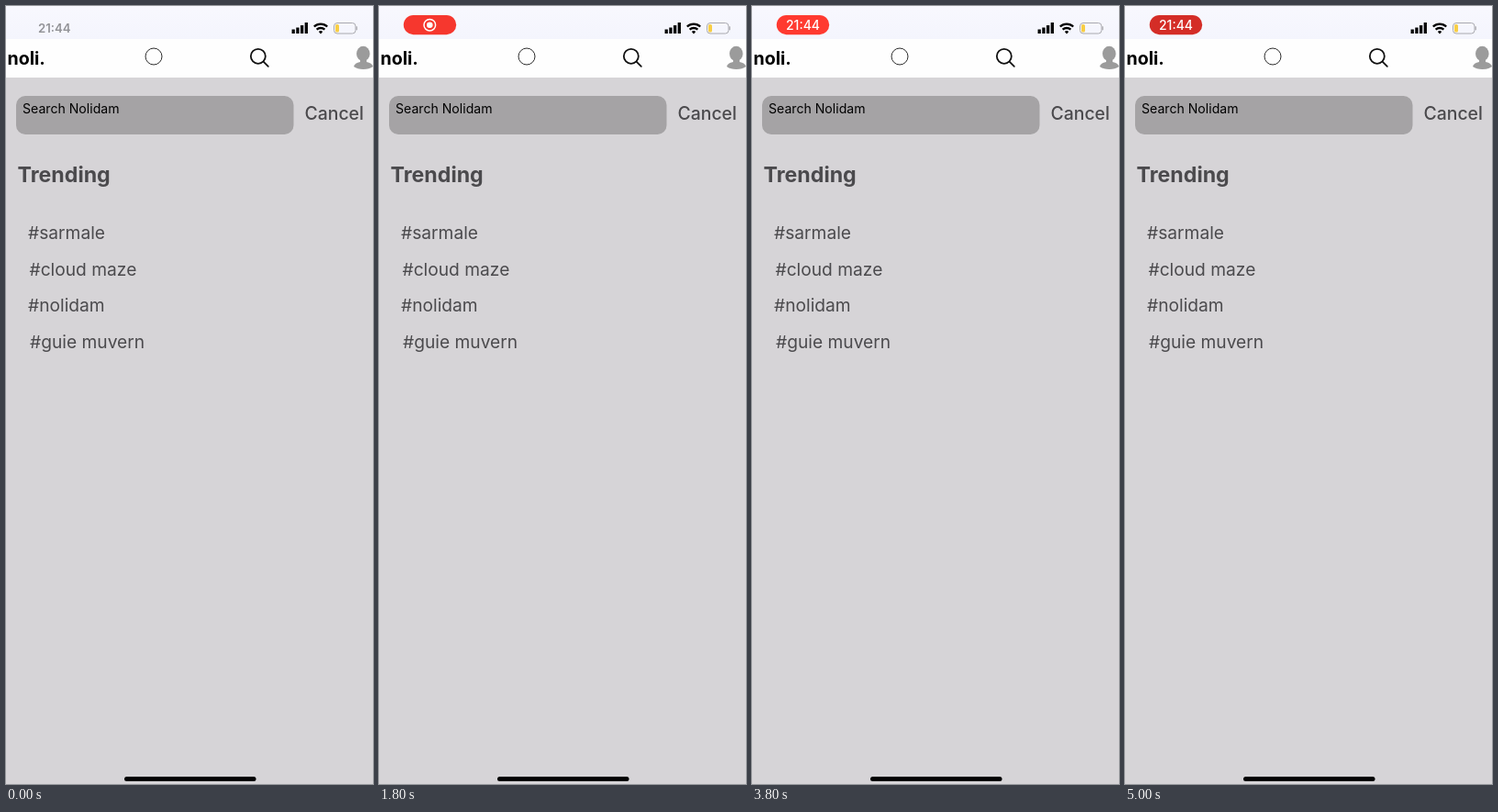
Write an HTML page that moves like this. It is 400 px wide and 848 px high and loops after 5040 ms.

```html
<!DOCTYPE html>
<html lang="ro">
<head>
<meta charset="utf-8">
<style>
  html, body { margin: 0; width: 100%; height: 100%; overflow: hidden; background: #d6d4d7; }
  svg { display: block; width: 400px; height: 848px; font-family: Inter, sans-serif; }
  #list, #trending, #cancel { fill: #4b4a4d; }
  #list { font-size: 19.2px; }
  #banner { filter: drop-shadow(0 0 1px rgba(0, 0, 0, .25)); }
</style>
</head>
<body>
<svg viewBox="0 0 400 848">
  <defs>
    <linearGradient id="glass" x1=".4" x2=".3" y2="1">
      <stop stop-color="#767577"/>
      <stop offset=".6" stop-color="#717072"/>
      <stop offset="1" stop-color="#676668"/>
    </linearGradient>
    <linearGradient id="sky" x2="0" y2="1">
      <stop stop-color="#f8f8fe"/>
      <stop offset="1" stop-color="#f4f5fd"/>
    </linearGradient>
  </defs>

  <rect width="400" height="848" fill="#d6d4d7"/>
  <rect width="400" height="36" fill="url(#sky)"/>
  <rect y="36" width="400" height="42" fill="#fefefe"/>

  <!-- navigation -->
  <text x="1.5" y="64" font-size="19.6" font-weight="700">noli.</text>
  <circle cx="161" cy="55" r="9" fill="none" stroke="#2b2b2b"/>
  <g fill="none" stroke="#111" stroke-width="1.8" stroke-linecap="round">
    <circle cx="274.800" cy="54.800" r="8"/>
    <path d="M280.800 60.800l5 5"/>
  </g>
  <g fill="#9b9b9b">
    <ellipse cx="389.300" cy="52" rx="7.300" ry="8.300"/>
    <path d="M386 57h7v4q6 1 7 5q-4 3-10.500 3t-10.500-3q1-4 7-5z"/>
  </g>

  <!-- search page -->
  <rect x="11" y="98" width="302.500" height="42" rx="10" fill="#a5a3a5"/>
  <text x="18" y="117" font-size="14.1">Search Nolidam</text>
  <text id="cancel" x="325.500" y="124" font-size="19.400" font-weight="500">Cancel</text>
  <text id="trending" x="12.500" y="192" font-size="23.200" font-weight="700">Trending</text>
  <g id="list">
    <text x="24" y="253.500">#sarmale</text>
    <text x="25.500" y="293.500">#cloud maze</text>
    <text x="24" y="333">#nolidam</text>
    <text id="pressed" x="26" y="373">#guie muvern</text>
  </g>
  <rect x="129" y="840" width="143.500" height="5" rx="2.500"/>

  <!-- status bar -->
  <path d="M313.200 30v-4.500M317.900 30v-6.500M322.600 30v-9M327.300 30v-12" stroke="#000" stroke-width="3.300"/>
  <g fill="none" stroke="#000" stroke-width="2.300">
    <path d="M335.800 22.500a10.500 10.500 0 0 1 14.400 0M338.600 25.700a6.500 6.500 0 0 1 8.800 0"/>
    <path d="M343 30.500l-2.200-2.600a3.500 3.500 0 0 1 4.400 0z" fill="#000" stroke="none"/>
  </g>
  <rect x="357.500" y="18.500" width="23.500" height="11.500" rx="3.500" fill="none" stroke="#a9a9ae"/>
  <rect x="359" y="20" width="4" height="8.500" rx="1.500" fill="#f8ce45"/>
  <path d="M382.200 22.200v4" stroke="#a9a9ae" stroke-width="1.300"/>
  <text id="clock" x="35" y="29" font-size="13.200" font-weight="600">21:44</text>
  <g id="pill">
    <rect id="pillBack" x="26.800" y="10" width="57.400" height="21.200" rx="10.600"/>
    <g id="record">
      <circle cx="55.300" cy="20.700" r="6.300" fill="none" stroke="#fff" stroke-width="1.500"/>
      <circle cx="55.300" cy="20.700" r="3.300" fill="#fff"/>
    </g>
    <text id="pillClock" x="55.500" y="25.700" font-size="14" font-weight="500" fill="#fff" text-anchor="middle">21:44</text>
  </g>

  <!-- notification -->
  <g id="banner">
    <rect x="7" y="30" width="387" height="88.500" rx="12" fill="url(#glass)"/>
    <rect x="17.500" y="40.500" width="21.500" height="21" rx="4.500" fill="#d8306e"/>
    <g fill="#c9c8ca">
      <text x="45.500" y="56" font-size="12.500">FOTOVELNA</text>
      <text x="378" y="56" font-size="13" text-anchor="end">acum</text>
    </g>
    <g fill="#f4f4f5">
      <text x="19.500" y="84" font-size="13.800" font-weight="600">Sorin în năzDRĂvanii</text>
      <text x="19.500" y="103" font-size="14.500">Nici eu n-am fost, is acum</text>
    </g>
  </g>
</svg>
<script>
  const LOOP = 5040;
  const el = id => document.getElementById(id);
  const set = (id, name, value) => el(id).setAttribute(name, value);
  const mix = (a, b, k) => a + (b - a) * k;

  // Smooth 0 to 1 progress between two times
  const ramp = (t, from, to) => {
    const k = Math.min(1, Math.max(0, (t - from) / (to - from)));
    return k * k * (3 - 2 * k);
  };
  const pulse = (t, upFrom, upTo, downFrom, downTo) => ramp(t, upFrom, upTo) - ramp(t, downFrom, downTo);

  function draw(t) {
    // Recording pill
    const appear = ramp(t, 120, 440);
    const glow = (1 + Math.cos((t - 3850) / 1800 * 2 * Math.PI)) / 2;
    const red = [[202, 255], [42, 58], [37, 48]].map(([low, high]) => Math.round(mix(low, high, glow)));
    const scale = mix(.7, 1, appear);
    set('clock', 'opacity', .4 * (1 - ramp(t, 0, 240)));
    set('pill', 'opacity', appear);
    set('pill', 'transform', `translate(55.5 20.7) scale(${scale}) translate(-55.5 -20.7)`);
    set('pillBack', 'fill', `rgb(${red})`);
    const swap = ramp(t, 2960, 3320);
    set('record', 'opacity', 1 - swap);
    set('pillClock', 'opacity', swap);

    // Touch, drag and spring back
    set('pressed', 'opacity', 1 - .8 * pulse(t, 600, 740, 860, 1100));
    set('list', 'transform', `translate(0 ${-11 * pulse(t, 1000, 1240, 1340, 1660)})`);

    // Notification
    const shown = pulse(t, 4120, 4500, 4600, 4960);
    set('banner', 'transform', `translate(0 ${-140 * (1 - shown)})`);
  }

  function tick() {
    draw(performance.now() % LOOP);
    requestAnimationFrame(tick);
  }
  tick();
</script>
</body>
</html>
```
